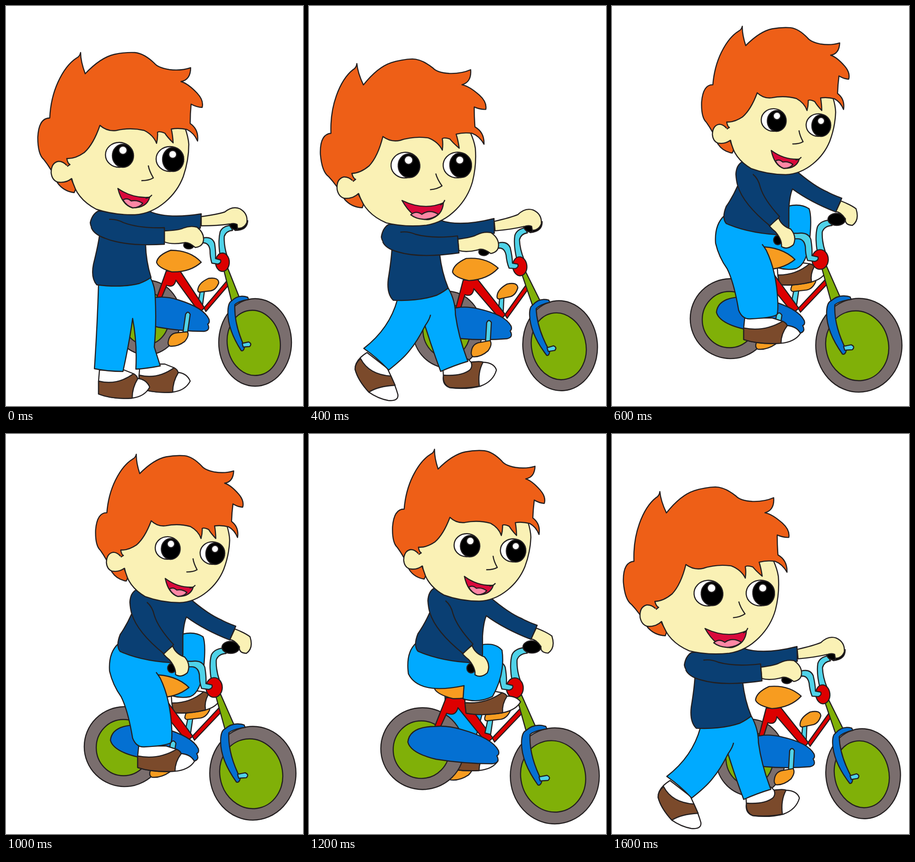
Recreate the animation shown at these times as an HTML page. Size 645x868 px, loop 1800 ms.

```html
<!DOCTYPE html>
<html lang="en">
<head>
<meta charset="utf-8">
<title>Boy and bicycle</title>
<style>
html, body { margin: 0; width: 100%; height: 100%; overflow: hidden; background: #fff; }
svg { display: block; width: 645px; height: 868px; stroke: #231f20; stroke-width: 2.4; stroke-linejoin: round; }
svg * { vector-effect: non-scaling-stroke; }
.pose { display: none; }
.hair { fill: #ee5f17; } .skin { fill: #faf1b5; } .shirt { fill: #0a3f73; }
.jeans { fill: #00aaff; } .brown { fill: #7b4a2b; } .white { fill: #fff; }
.tyre { fill: #7a6e6e; } .green { fill: #80b008; } .blue { fill: #0470d2; }
.red { fill: #dd0000; } .orange { fill: #f79c20; } .cyan { fill: #4fd2e8; }
.lips { fill: #d9093b; } .tongue { fill: #ff87a5; } .black { fill: #000; } .line { fill: none; }
</style>
</head>
<body>
<svg viewBox="0 0 645 868">
<defs>
  <g id="head">
    <path class="skin" d="M130 335L132 372L143 375Q152 418 196 441Q235 454 280 453C330 450 370 410 385 370Q397 335 397 300Q396 285 389 265L200 250Z"/>
    <path class="hair" d="M162 101Q162 120 172 147Q205 112 235 105Q258 100 280 101Q300 103 322 124Q330 134 355 138Q380 141 401 134Q401 160 380 164Q395 168 415 189Q430 205 426 220Q415 220 402 213Q400 234 400 255Q419 268 416 293Q408 275 393 268Q375 264 359 267Q362 280 363 297Q350 284 345 276Q333 271 329 274Q330 285 327 298Q320 280 300 270Q270 263 240 270Q220 273 204 259Q190 300 170 318Q150 332 132 331Q134 342 139 344L130 350L125 372L142 376Q146 385 151 398L148 405Q125 402 112 384L98 356Q90 343 82 333Q69 322 69 285Q71 243 95 243Q97 200 113 165Q130 128 153 113Q160 110 162 101Z"/>
    <path class="skin" d="M132 346Q124 337 114 337Q98 340 98 362Q100 378 112 382Q130 385 143 374"/>
    <ellipse class="white" cx="246" cy="323" rx="30" ry="27"/>
    <ellipse class="black" cx="254" cy="325" rx="23" ry="25"/>
    <circle class="white" cx="254" cy="313" r="9"/>
    <ellipse class="white" cx="356" cy="332" rx="30" ry="27"/>
    <ellipse class="black" cx="363" cy="333" rx="23" ry="26"/>
    <circle class="white" cx="362" cy="322" r="8.5"/>
    <path class="line" d="M309 346Q311 358 320 373Q310 379 294 379"/>
  </g>

  <g id="smile">
    <path class="lips" d="M243 396Q275 418 312 415Q306 438 275 438Q252 432 243 396Z"/>
    <path class="tongue" d="M254 421Q263 415 272 423Q285 420 297 428Q290 438 275 438Q262 434 254 421Z"/>
    <path class="line" d="M303 417Q311 417 317 410"/>
  </g>

  <g id="shoe">
    <path class="white" d="M2 0L0 24L0 52Q30 64 72 61Q100 58 111 37Q104 20 84 18L76 8L56 0Z"/>
    <path class="brown" d="M0 24Q40 34 76 8Q84 12 85 19Q73 38 73 61Q30 64 0 52Z"/>
  </g>

  <g id="upperPedal">
    <path class="cyan" d="M422 618L431 618L427 648L417 645Z"/>
    <path class="orange" d="M417 613Q420 600 440 591Q462 588 462 601Q456 616 445 618L420 621Q415 620 417 613Z"/>
  </g>
  <g id="lowerPedal">
    <path class="cyan" d="M390 669Q395 660 400 669L394 711L384 711Z"/>
    <path class="orange" d="M353 725Q357 710 372 709L394 707Q399 715 388 728Q372 740 356 738Q350 735 353 725Z"/>
  </g>

  <g id="bike">
    <ellipse class="tyre" cx="306" cy="676" rx="74" ry="81"/>
    <ellipse class="green" cx="304" cy="678" rx="50" ry="57"/>
    <path class="red" d="M348 575L325 640L335 640L349 606Q365 613 369 595L420 665L431 655L378 575Z"/>
    <path class="red" d="M430 655L480 596L483 606L434 663Z"/>
    <path class="blue" d="M280 663Q283 632 330 632Q350 630 375 638Q430 655 441 680Q443 688 438 690Q445 704 430 706Q380 706 330 697Q285 685 280 663Z"/>
    <path class="orange" d="M327 556Q330 540 358 530Q400 530 424 556Q400 578 360 577Q330 568 327 556Z"/>
    <path class="green" d="M473 573L482 570L507 633L490 641Z"/>
    <ellipse class="tyre" cx="541" cy="730" rx="79" ry="95"/>
    <ellipse class="green" cx="538" cy="731" rx="57.5" ry="71" transform="rotate(-8 538 731)"/>
    <path class="blue" d="M490 640Q505 625 525 632L527 637Q505 640 497 648Q495 690 518 740Q516 750 511 748Q480 700 482 660Q483 643 490 640Z"/>
    <path class="cyan" d="M513 732L527 729Q535 733 529 739L515 740Z"/>
    <path class="cyan" d="M465 542Q460 510 465 490Q470 478 487 476L492 487Q478 488 474 500Q473 520 480 542Z"/>
    <ellipse class="red" cx="470" cy="556" rx="15" ry="20"/>
    <path class="cyan" d="M410 503L429 503Q448 500 453 515Q456 535 455 548L466 551Q468 558 460 560L447 558Q443 545 443 530Q441 515 430 514L410 514Z"/>
  </g>
  <g id="pushedBike"><use href="#upperPedal"/><use href="#bike"/><use href="#lowerPedal"/></g>

  <g id="pushing">
    <path class="black" d="M525 466Q524 487 498 487L490 480Z"/>
    <path class="skin" d="M424 457Q460 452 475 447Q492 433 508 440Q526 450 523 470Q515 487 495 481Q490 474 486 473Q460 477 424 477Z"/>
    <path class="black" d="M485 474Q493 470 502 474L503 486Q488 486 485 474Z"/>
    <path class="shirt" d="M200 445Q187 452 183 470Q184 485 203 498Q200 520 190 560Q184 590 197 605Q250 612 290 602Q305 596 315 589Q304 555 303 515L340 490Q370 490 422 482L424 451Q350 463 310 445Z"/>
    <ellipse class="black" cx="397" cy="519" rx="11" ry="8"/>
    <path class="skin" d="M344 488Q375 487 385 482Q400 476 415 480Q430 492 429 507Q428 522 411 524Q395 510 385 514Q360 518 344 512Z"/>
    <path class="shirt" d="M185 480Q190 495 215 504Q260 522 344 517L344 481Q290 483 255 470Q240 462 224 463"/>
    <use href="#head"/>
  </g>

  <g id="standing">
    <use href="#pushedBike"/>
    <use href="#shoe" x="289" y="777"/>
    <use href="#shoe" x="201" y="790"/>
    <path class="jeans" d="M201 604L314 590Q324 610 324 630Q327 690 322 740L335 781Q305 787 282 788Q285 730 275 678Q268 730 254 793Q220 793 192 787Q198 700 201 604Z"/>
    <use href="#pushing"/>
    <use href="#smile"/>
  </g>

  <g id="riding">
    <ellipse class="black" cx="488" cy="463" rx="19" ry="13"/>
    <path class="skin" d="M497 423Q520 432 530 440Q538 465 522 476Q505 475 507 462Q497 447 486 446Z"/>
    <path class="shirt" d="M283 338Q270 345 269 365Q270 380 273 390Q262 415 248 435Q238 460 248 472Q300 495 375 497L384 480L384 440Q386 410 392 397Q430 425 486 447L499 417Q475 408 467 403Q440 392 398 356Z"/>
    <ellipse class="black" cx="360" cy="508" rx="9" ry="10"/>
    <path class="skin" d="M362 460Q368 477 388 484Q402 500 394 518Q380 530 368 522Q370 508 355 490Q345 482 341 476Z"/>
    <path class="shirt" d="M306 365Q318 375 322 393Q330 420 364 457L343 477Q285 430 273 390"/>
    <g transform="matrix(.889 .026 -.031 .906 142.1 -51.7)"><use href="#head"/><use href="#smile"/></g>
  </g>

  <!-- bicycle parts fitted to the rider -->
  <g id="riddenBike" transform="matrix(1.185 0 0 1.07 -105 -44.9)"><use href="#bike"/></g>
  <g id="highPedal" transform="matrix(1.185 0 0 1.07 -105 -44.9)"><use href="#upperPedal"/></g>
  <g id="lowPedal" transform="matrix(1.185 0 0 1.07 -105 -44.9)"><use href="#lowerPedal"/></g>
</defs>

<g class="pose" id="stand"><use href="#standing"/></g>

<g class="pose" id="step"><use href="#standing" transform="matrix(1.067 0 0 1.049 -30.6 -41.9)"/></g>

<g class="pose" id="stride">
  <use href="#pushedBike" transform="matrix(1.022 -.086 .086 1.025 -70.3 35.4)"/>
  <path class="white" d="M291 790L292 803Q289 822 305 828Q340 833 372 825Q400 815 407 790Q402 774 378 773L352 773L345 766Z"/>
  <path class="brown" d="M292 801Q330 804 349 790Q356 783 352 773Q372 770 378 773Q366 795 370 825Q340 831 306 828Q290 822 292 801Z"/>
  <path class="white" d="M126 752Q100 768 100 788Q106 812 130 838Q150 852 172 856Q195 858 193 843Q188 825 178 803L170 786Z"/>
  <path class="brown" d="M112 765Q100 775 100 788Q106 812 130 838Q150 825 187 823L178 803Q130 800 112 765Z"/>
  <path class="jeans" d="M192 637Q175 700 119 743Q150 765 173 790Q205 765 218 748Q235 728 252 694Q268 745 286 793Q315 780 345 771Q325 720 318 670Q318 640 303 613Z"/>
  <path class="line" d="M252 694Q262 680 264 670"/>
  <use href="#pushing" transform="matrix(1.022 -.086 .086 1.025 -70.3 35.4)"/>
  <path class="lips" d="M202 422Q250 445 292 427Q290 455 262 463Q228 468 202 422Z"/>
  <path class="tongue" d="M221 453Q232 443 245 452Q262 440 281 452Q270 462 250 463Q232 462 221 453Z"/>
  <path class="line" d="M285 432Q292 429 295 421"/>
</g>

<g class="pose" id="rideDown">
  <use href="#highPedal"/>
  <use href="#shoe" transform="translate(357 566) rotate(-10) scale(.95 .75)"/>
  <path class="jeans" d="M250 465L375 497L384 480L384 434Q410 428 428 440Q434 455 430 500Q425 560 400 570Q380 574 360 568L320 520Z"/>
  <use href="#riddenBike"/>
  <use href="#lowPedal"/>
  <use href="#shoe" transform="translate(286 677) scale(1.11 .9)"/>
  <path class="jeans" d="M244 455Q222 475 225 515Q232 545 250 570Q265 600 275 660Q283 680 300 679Q345 677 358 670Q361 665 360 640Q357 575 335 530Q330 522 326 517"/>
  <use href="#riding"/>
</g>

<g class="pose" id="rideUp" transform="matrix(1.032 0 0 1.024 -19.4 -12)">
  <use href="#lowPedal"/>
  <use href="#shoe" transform="translate(300 673) scale(1.05 .85)"/>
  <path class="jeans" d="M300 520L400 540Q385 600 365 672Q325 682 300 676Q312 600 300 520Z"/>
  <use href="#riddenBike"/>
  <use href="#highPedal"/>
  <use href="#shoe" transform="translate(345 562) rotate(-6) scale(1.05 .8)"/>
  <path class="jeans" d="M244 455Q222 475 228 520Q250 565 345 545L343 573Q375 583 405 568Q432 520 425 470Q400 440 330 480"/>
  <use href="#riding"/>
</g>
</svg>
<script>
const STEP = 200;
const order = ["stand", "step", "stride", "rideDown", "rideUp", "rideDown", "rideUp", "rideDown", "stride"];
const poses = document.querySelectorAll(".pose");
const start = performance.now();

function draw() {
  const elapsed = Math.max(0, performance.now() - start);
  const current = order[Math.floor(elapsed / STEP) % order.length];
  for (const pose of poses) pose.style.display = pose.id === current ? "block" : "none";
  requestAnimationFrame(draw);
}
draw();
</script>
</body>
</html>
```
